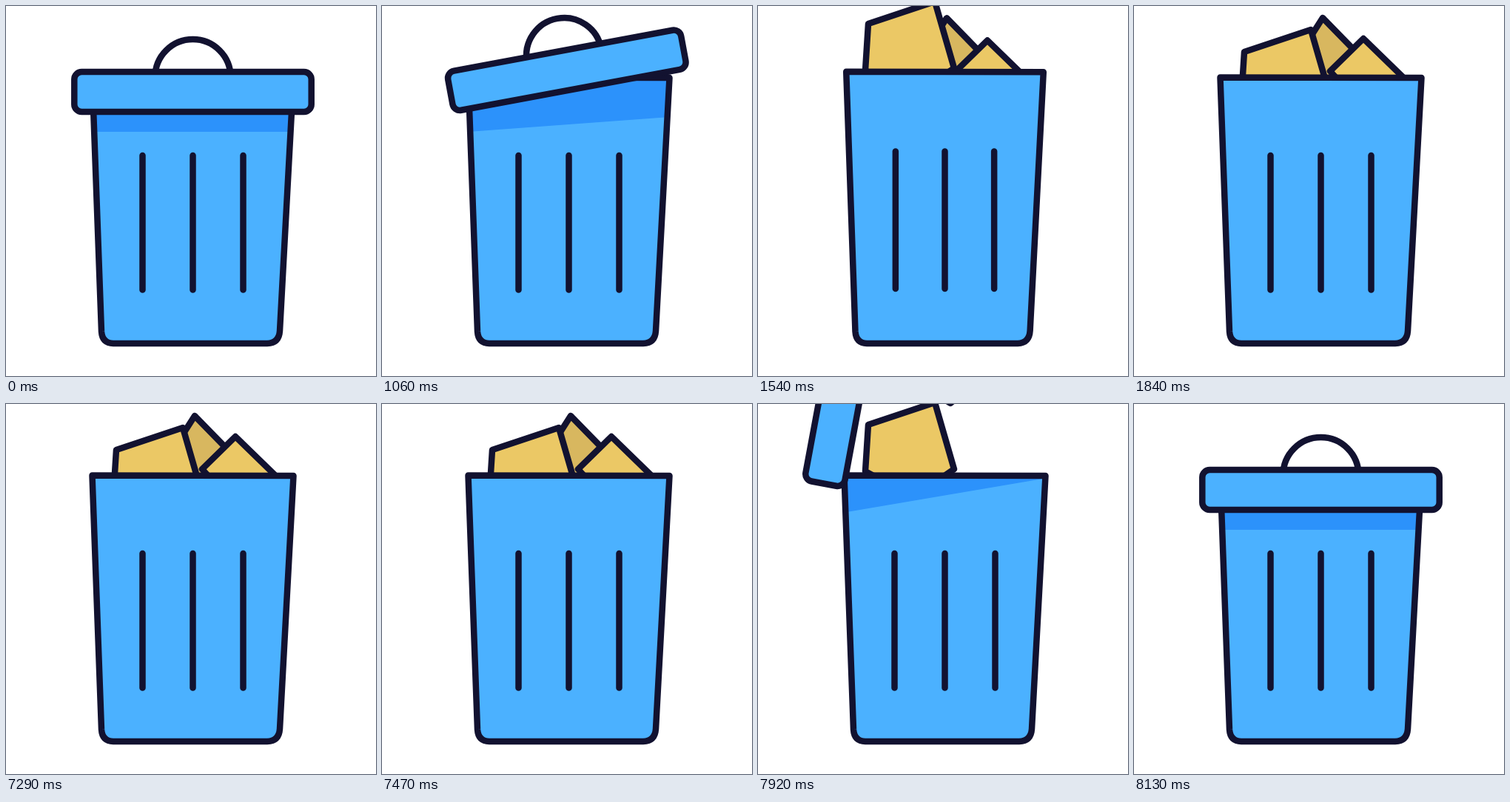
Write an HTML page with a canvas that moves like this. It is 500 px wide and 500 px high and loops after 8160 ms.

```html
<!DOCTYPE html>
<html>
<head>
<meta charset="utf-8">
<title>Bin</title>
<style>
html, body { margin: 0; width: 100%; height: 100%; overflow: hidden; background: #fff; }
canvas { display: block; }
</style>
</head>
<body>
<canvas id="stage" width="500" height="500"></canvas>
<script>
const ctx = document.getElementById('stage').getContext('2d');
const LOOP = 8160, STEP = 30, LAST = 28, OPEN = 1030, CLOSE = 7290;
const INK = '#121230', BLUE = '#4bb1ff', SHADE = '#2c92fb';
const GOLD = '#ebc865', DARK_GOLD = '#d8b75f', DEEP_GOLD = '#e2b246';
const FALL = 62; // pixels per step

const LEFT = [[149, 62], [239, 32], [265, 122], [210, 160], [145, 125]];
const MIDDLE = [[255, 16], [333, 96], [260, 156], [193, 113]];
const RIGHT = [[310, 44], [383, 115], [303, 130], [265, 88]];

const clamp = (v, lo = 0, hi = 1) => Math.min(hi, Math.max(lo, v));

function paint(path, fill) {
  if (fill) {
    ctx.fillStyle = fill;
    ctx.fill(path);
  }
  ctx.stroke(path);
}

function polygon(points, dx = 0, dy = 0) {
  const path = new Path2D();
  for (const [x, y] of points) path.lineTo(x + dx, y + dy);
  path.closePath();
  return path;
}

function drawPapers(s) {
  const paper = (shape, fill, dy, dx = 0) => paint(polygon(shape, dx, dy), fill);
  if (s > 0 && s < 13) {
    // Three sheets drop through the opening one after another.
    paper(MIDDLE, DEEP_GOLD, (s - 9) * FALL - 33);
    paper(LEFT, GOLD, (s - 7) * FALL - 34);
    paper(RIGHT, GOLD, (s - 9) * FALL - 118, -63);
  } else if (s >= 13) {
    // The heap rises while the last sheet lands on it.
    const rest = 1 - clamp((s - 13) / 6);
    const tinted = s >= 14 && s <= 16;
    paper(MIDDLE, tinted ? BLUE : DARK_GOLD, 64 * rest ** 3);
    paper(RIGHT, tinted ? BLUE : GOLD, 92 * rest ** 2);
    paper(LEFT, tinted ? BLUE : GOLD, Math.min(0, (s - 16) * FALL - 162));
  }
}

function drawBin(s) {
  const stretch = Math.sin(Math.PI * clamp((s - 13) / 6));
  const X = x => 252.5 + (x - 252.5) * (1 - 0.04 * stretch);
  const Y = y => 456 - (456 - y) * (1 + 0.043 * stretch);

  const body = new Path2D();
  body.moveTo(X(116.5), Y(96.5));
  body.lineTo(X(388.5), Y(97));
  body.lineTo(X(370), Y(439));
  body.quadraticCurveTo(X(369), Y(455.5), X(353), 456);
  body.lineTo(X(145), 456);
  body.quadraticCurveTo(X(130), Y(455.5), X(129), Y(440));
  body.closePath();
  ctx.fillStyle = BLUE;
  ctx.fill(body);

  if (s < 11) {
    const low = 170 - 58 * (s / 9) ** 3.5;
    const high = 170 - 69 * clamp(s / 7);
    ctx.save();
    ctx.clip(body);
    ctx.fillStyle = SHADE;
    ctx.fill(polygon([[120, 90], [385, 90], [385, high], [120, low]]));
    ctx.restore();
  }
  ctx.stroke(body);

  for (const x of [184.5, 252.5, 320.5]) {
    const groove = new Path2D();
    groove.moveTo(X(x), Y(202));
    groove.lineTo(X(x), Y(383.5));
    ctx.stroke(groove);
  }
}

function drawLid(s) {
  if (s > 12) return;
  const turn = (1 - Math.cos(Math.PI * clamp(s / 9))) / 2;
  const away = Math.max(0, s - 6.4);
  ctx.save();
  ctx.translate(92.3 - 8.8 * away ** 2, 116 - 14 * away);
  ctx.rotate(-turn * Math.PI / 2);
  const handle = new Path2D();
  handle.arc(160.2, -20, 51, Math.PI, 0);
  paint(handle);
  const plate = new Path2D();
  plate.roundRect(0, -27, 320.4, 54, 10);
  paint(plate, BLUE);
  ctx.restore();
}

function stateAt(t) {
  if (t < OPEN) return 0;
  if (t < CLOSE) return Math.min(LAST, Math.floor((t - OPEN) / STEP) + 1);
  return Math.max(0, LAST - Math.floor((t - CLOSE) / STEP));
}

function draw(now) {
  const s = stateAt(now % LOOP);
  ctx.fillStyle = '#fff';
  ctx.fillRect(0, 0, 500, 500);
  ctx.strokeStyle = INK;
  ctx.lineWidth = 8.5;
  ctx.lineCap = ctx.lineJoin = 'round';
  drawPapers(s);
  drawBin(s);
  drawLid(s);
}

const start = performance.now();
function tick() {
  draw(performance.now() - start);
  requestAnimationFrame(tick);
}
tick();
</script>
</body>
</html>
```
